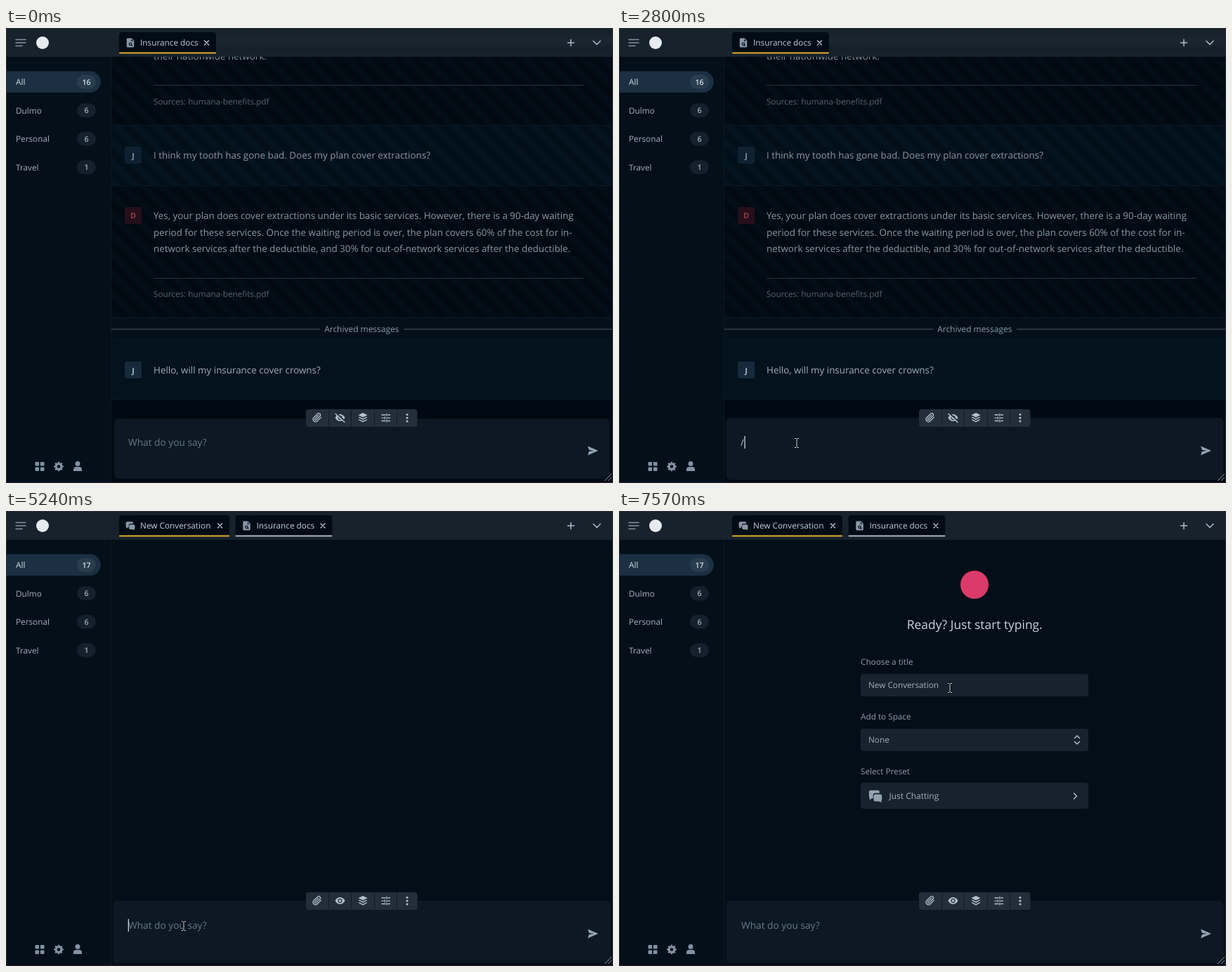
These frames come from a looping animation (864x648 px, 8 s). An HTML page:

```html
<!DOCTYPE html>
<html lang="en">
<head>
<meta charset="utf-8">
<title>Chat app</title>
<style>
html, body { margin: 0; width: 100%; height: 100%; overflow: hidden; background: #020f18; }
svg { display: block; width: 864px; height: 648px; }
text { font-family: "Open Sans", "Noto Sans", sans-serif; font-size: 11.75px; fill: #a3b1bf; text-rendering: geometricPrecision; white-space: pre; }
.msg { font-size: 13.4px; fill: #8a97a4; }
.src { fill: #56636f; }
.mid { text-anchor: middle; }
.badge { font-size: 10.7px; font-weight: 600; text-anchor: middle; }
.avatar { font-size: 11px; font-weight: 700; text-anchor: middle; }
.tab { font-size: 11.8px; fill: #c3ced9; }
.label { fill: #8d9cab; }
.line { fill: none; stroke-width: 1.5; stroke-linecap: round; stroke-linejoin: round; }
</style>
</head>
<body>
<svg viewBox="0 0 864 648">
  <defs>
    <pattern id="stripes" width="20" height="20" patternUnits="userSpaceOnUse" patternTransform="rotate(-45)">
      <rect x="10" width="10" height="20" fill="#000408" opacity=".28"/>
    </pattern>
    <linearGradient id="haze" x2="0" y2="1">
      <stop stop-color="#151f2a"/>
      <stop offset=".43" stop-color="#1b2631"/>
      <stop offset=".75" stop-color="#151f2a"/>
      <stop offset="1" stop-color="#17222d"/>
    </linearGradient>
    <symbol id="doc" viewBox="0 0 24 24" overflow="visible">
      <path fill="#8797a7" fill-rule="evenodd" d="M5 1h10l6 6v14q0 2-2 2H5q-2 0-2-2V3q0-2 2-2zM14 3v5h5zM12 11a4 4 0 1 0 2 7.500l2 2 1.500-1.500-2-2A4 4 0 0 0 12 11zm0 2a2 2 0 1 1 0 4 2 2 0 0 1 0-4z"/>
    </symbol>
    <symbol id="chat" viewBox="0 0 24 24" overflow="visible">
      <path d="M4 2h12q3 0 3 3v2h-7q-4 0-4 4v5H6l-4 3v-4Q1 14 1 12V5q0-3 3-3z"/>
      <path d="M12 9h8q3 0 3 3v5q0 2-1 3v3l-4-2h-6q-3 0-3-3v-6q0-3 3-3z"/>
    </symbol>
    <symbol id="eye" viewBox="0 0 24 24" overflow="visible">
      <path fill-rule="evenodd" d="M12 4C7 4 2.700 7.500 1 12c1.700 4.500 6 8 11 8s9.300-3.500 11-8c-1.700-4.500-6-8-11-8zm0 3a5 5 0 1 1 0 10 5 5 0 0 1 0-10z"/>
      <circle cx="12" cy="12" r="3"/>
    </symbol>
  </defs>

  <rect width="864" height="648" fill="#020f18"/>

  <g id="thread">
    <g id="rows"></g>
    <rect x="149" y="412" width="715" height="32" fill="#03101a"/>
    <rect x="149" y="444" width="715" height="85" fill="#03121d"/>
    <rect x="149" y="529" width="715" height="119" fill="#010a12"/>
    <path d="M149 138.500H864M149 224.500H864M149 412.500H864M149 443.500H864M149 529.500H864" stroke="#081925"/>
    <path d="M210 81.500H822.500M210 356.500H822.500" stroke="#26343f"/>
    <path d="M149 429H447M566 429H864" stroke="#4c5a66"/>
    <text class="msg" x="210" y="45">their nationwide network.</text>
    <text class="src" x="210" y="108.500">Sources: humana-benefits.pdf</text>
    <rect x="169" y="169" width="24" height="24" rx="3" fill="#0f2131"/>
    <text class="avatar" x="181" y="185.500" style="fill:#7f93a5">J</text>
    <text class="msg" x="210" y="186.300">I think my tooth has gone bad. Does my plan cover extractions?</text>
    <rect x="169" y="255" width="24" height="24" rx="3" fill="#260f1b"/>
    <text class="avatar" x="181" y="271" style="fill:#8d3f45">D</text>
    <text class="msg" x="210" y="272">Yes, your plan does cover extractions under its basic services. However, there is a 90-day waiting</text>
    <text class="msg" x="210" y="295.500">period for these services. Once the waiting period is over, the plan covers 60% of the cost for in-</text>
    <text class="msg" x="210" y="319">network services after the deductible, and 30% for out-of-network services after the deductible.</text>
    <text class="src" x="210" y="383">Sources: humana-benefits.pdf</text>
    <text class="mid label" x="506.300" y="433" style="font-size:11.95px">Archived messages</text>
    <rect x="169" y="475" width="24" height="24" rx="3" fill="#162a3b"/>
    <text class="avatar" x="181" y="491.500" style="fill:#a9bacb">J</text>
    <text class="msg" x="210" y="492" style="fill:#a0adb9">Hello, will my insurance cover crowns?</text>
  </g>

  <g id="setup">
    <circle cx="506" cy="105" r="20" fill="#dc3a69"/>
    <text class="mid" x="506.300" y="168" style="font-size:17.4px;font-weight:500;fill:#cbd6e1">Ready? Just start typing.</text>
    <g fill="#16222d">
      <rect x="344" y="232" width="324" height="32" rx="4"/>
      <rect x="344" y="310" width="324" height="32" rx="4"/>
      <rect x="344" y="387" width="324" height="37" rx="4"/>
    </g>
    <text class="label" x="344" y="219.300">Choose a title</text>
    <text x="355" y="252.300">New Conversation</text>
    <text class="label" x="344" y="297.200">Add to Space</text>
    <text x="355" y="330.200">None</text>
    <text class="label" x="344" y="374.600">Select Preset</text>
    <text x="384.500" y="410.300" style="font-size:12px">Just Chatting</text>
    <use href="#chat" x="355" y="396" width="20" height="20" fill="#93a3b3"/>
    <path class="line" stroke="#b0bdc9" d="M648.500 323.500l3.500-3.500 3.500 3.500M648.500 328.500l3.500 3.500 3.500-3.500M647.500 402l4 4-4 4"/>
  </g>

  <rect width="864" height="41" fill="#17222d"/>
  <rect id="headHaze" x="299" width="565" height="41" fill="url(#haze)"/>
  <path class="line" stroke="#8494a4" d="M14 16.500H28M14 21H28M14 25.500H23"/>
  <circle cx="52" cy="21" r="9" fill="#e6ebf0"/>
  <path class="line" stroke="#b0bdc9" d="M799.500 21H808.500M804 16.500V25.500M836 18.500l5 5 5-5"/>
  <g id="tabs"></g>

  <rect y="41" width="149" height="607" fill="#030f19"/>
  <path d="M149.500 41V648" stroke="#0a1924"/>
  <g id="spaces"></g>
  <g fill="#8192a3">
    <rect x="41.500" y="618" width="5.600" height="5.600" rx="1.200"/>
    <rect x="48.900" y="618" width="5.600" height="5.600" rx="1.200"/>
    <rect x="41.500" y="625.400" width="5.600" height="5.600" rx="1.200"/>
    <rect x="48.900" y="625.400" width="5.600" height="5.600" rx="1.200"/>
    <circle cx="102" cy="620.500" r="3.500"/>
    <path d="M96 631v-2q0-4 4-4h4q4 0 4 4v2z"/>
  </g>
  <g fill="none" stroke="#8192a3">
    <circle cx="75" cy="624.500" r="3.900" stroke-width="3.200"/>
    <circle cx="75" cy="624.500" r="5.900" stroke-width="1.800" pathLength="16" stroke-dasharray="1" stroke-dashoffset=".5"/>
  </g>

  <rect id="box" rx="6" fill="#0c1823"/>
  <text id="hint" x="174" y="595" style="font-size:13.7px;fill:#667a8c">What do you say?</text>
  <text id="typed" x="173" y="595" style="font-size:13px;fill:#c3ced9"></text>
  <rect id="caret" y="581" width="1.200" height="18" fill="#dce5ee"/>
  <path d="M828 595.500L843 602L828 608.500L830 603L837 602L830 601Z" fill="#93a5b6"/>
  <path d="M852 645l10-10M857 645l5-5" stroke="#8b949c"/>

  <rect x="427" y="543" width="158.500" height="25" rx="4" fill="#222f3b"/>
  <path d="M459.500 544V567M491.500 544V567M524.500 544V567M556.500 544V567" stroke="#101c27"/>
  <g fill="#b3c0cd">
    <path class="line" stroke="#b3c0cd" style="stroke-width:2.2" transform="translate(436 548) scale(.58)" d="M21.400 11l-9.200 9.200a6 6 0 0 1-8.500-8.500l9.200-9.200a4 4 0 0 1 5.700 5.700l-9.200 9.200a2 2 0 0 1-2.900-2.900l8.500-8.500"/>
    <use href="#eye" x="468" y="547.500" width="15" height="15"/>
    <g id="slash" class="line">
      <path d="M470 548.500l13 12" stroke="#222f3b" stroke-width="2"/>
      <path d="M469 549.500l13 12" stroke="#b3c0cd"/>
    </g>
    <path d="M508 548l6.500 3.300-6.500 3.300-6.500-3.300z"/>
    <path d="M503 553.800l5 2.400 5-2.400 1.500.800-6.500 3.300-6.500-3.300zM503 557.300l5 2.400 5-2.400 1.500.800-6.500 3.300-6.500-3.300z"/>
    <path class="line" stroke="#b3c0cd" style="stroke-width:1.3" d="M535 551H540M544 551H546.500M535 555.300H537M541 555.300H546.500M535 559.500H540M544 559.500H546.500M542 549.500v3M539 553.800v3M542 558v3"/>
    <circle cx="571" cy="550.500" r="1.500"/><circle cx="571" cy="555.200" r="1.500"/><circle cx="571" cy="560" r="1.500"/>
  </g>

  <path d="M.5 648V.5H863.500V648" fill="none" stroke="#292f36"/>
  <path d="M0 647.500H864" stroke="#321b2a"/>

  <g id="beam" fill="none">
    <path d="M-3 -6.500H-1L0 -5.500L1 -6.500H3M0 -5.500V5.500M-3 6.500H-1L0 5.500L1 6.500H3" stroke="#02080d" stroke-width="2.400"/>
    <path d="M-3 -6.500H-1L0 -5.500L1 -6.500H3M0 -5.500V5.500M-3 6.500H-1L0 5.500L1 6.500H3" stroke="#d5dce3"/>
  </g>
  <path id="arrow" d="M0 0V16L3.700 12.600L6.200 18.300L8.700 17.200L6.200 11.600H11.500Z" fill="#fff" stroke="#111"/>
</svg>
<script>
const LOOP = 8000, SWITCH = 5240;
const $ = id => document.getElementById(id);
const show = (id, on) => $(id).style.display = on ? "" : "none";
const at = (steps, t) => steps.filter(s => s[0] <= t).pop();

// [time, x, y, shape]
const pointer = [
  [0, 0, 0, ""], [470, 386, 624, "beam"], [580, 295, 603, "beam"], [690, 253, 591, "beam"],
  [6360, 258, 578, "beam"], [6470, 269, 490, "arrow"], [6580, 279, 413, "arrow"],
  [6800, 290, 392, "arrow"], [6910, 330, 346, "arrow"], [7020, 390, 294, "arrow"],
  [7130, 452, 259, "beam"], [7240, 471, 252, "beam"]
];
// [time, text, caret on]
const typing = [
  [0, "", 0], [1130, "", 1], [1590, "", 0], [2250, "", 1],
  [2690, "/", 0], [2800, "/", 1], [3240, "/", 0], [3460, "/n", 1], [3810, "/n", 0],
  [3920, "/ne", 1], [4030, "/new", 1], [4360, "/new", 0], [4910, "/new", 1],
  [5130, "", 1], [5460, "", 0], [5920, "", 1], [6470, "", 0], [7020, "", 1], [7570, "", 0]
];

// Stripes start from each row's bottom left corner.
function archivedRow(top, bottom, color) {
  const size = `y="${top - bottom}" width="715" height="${bottom - top}"`;
  return `<g transform="translate(149 ${bottom})">
    <rect ${size} fill="${color}"/><rect ${size} fill="url(#stripes)"/></g>`;
}
$("rows").innerHTML = archivedRow(41, 139, "#020d15") +
  archivedRow(139, 224, "#03131f") + archivedRow(224, 412, "#020d15");

function tab(x, w, label, icon, color) {
  const end = x + w - 13.5;
  return `<path d="M${x} 36V10q0-4 4-4h${w - 8}q4 0 4 4v26z" fill="#020c15"/>
    <rect x="${x}" y="34.500" width="${w}" height="1.900" rx=".9" fill="${color}"/>
    <use href="#${icon}" x="${x + 9}" y="14" width="14" height="14" fill="#8797a7"/>
    <text class="tab" x="${x + 30}" y="25.200">${label}</text>
    <path class="line" stroke="#c3ced9" style="stroke-width:1.3" d="M${end - 3} 18l6 6m0 -6l-6 6"/>`;
}

function space(name, count, i) {
  const y = 76.8 + i * 40.5, on = i === 0;
  return (on ? '<path d="M1 61.500H119.500a15.250 15.250 0 0 1 0 30.500H1z" fill="#1b3042"/>' : "") +
    `<rect x="101" y="${y - 10}" width="27" height="20" rx="10" fill="${on ? "#293d4f" : "#14212d"}"/>
    <text x="14" y="${y + 4.2}" ${on ? 'style="fill:#d3dde7"' : ""}>${name}</text>
    <text class="badge" x="114.500" y="${y + 4.1}" ${on ? 'style="fill:#d3dde7"' : ""}>${count}</text>`;
}

let lastFresh;
function setScene(fresh) {
  if (fresh === lastFresh) return;
  lastFresh = fresh;
  $("tabs").innerHTML = fresh
    ? tab(161, 157, "New Conversation", "chat", "#e2ad2f") + tab(326.5, 138, "Insurance docs", "doc", "#a9b6c4")
    : tab(161, 138, "Insurance docs", "doc", "#e2ad2f");
  $("spaces").innerHTML = [["All", fresh ? 17 : 16], ["Dulmo", 6], ["Personal", 6], ["Travel", 1]]
    .map(([name, count], i) => space(name, count, i)).join("");
  show("thread", !fresh);
  show("headHaze", !fresh);
  show("slash", !fresh);
}

function setBox(focus) {
  const grow = focus ? 1.5 : 0;
  const area = { x: 154 - grow, y: 556.5 - grow, width: 705 + 2 * grow, height: 85.5 + 2 * grow };
  for (const key in area) $("box").setAttribute(key, area[key]);
}

function draw(t) {
  setScene(t >= SWITCH);
  show("setup", t >= SWITCH + 110);
  setBox(t >= 1130);

  const [, text, caretOn] = at(typing, t);
  $("typed").textContent = text;
  show("hint", !text);
  show("caret", caretOn);
  $("caret").setAttribute("x", 173.7 + (text ? $("typed").getComputedTextLength() : 0));

  const [, x, y, shape] = at(pointer, t);
  for (const id of ["beam", "arrow"]) {
    show(id, id === shape);
    $(id).setAttribute("transform", `translate(${x} ${y})`);
  }
}

const start = performance.now();
function tick() {
  draw((performance.now() - start) % LOOP);
  requestAnimationFrame(tick);
}
tick();
</script>
</body>
</html>
```
